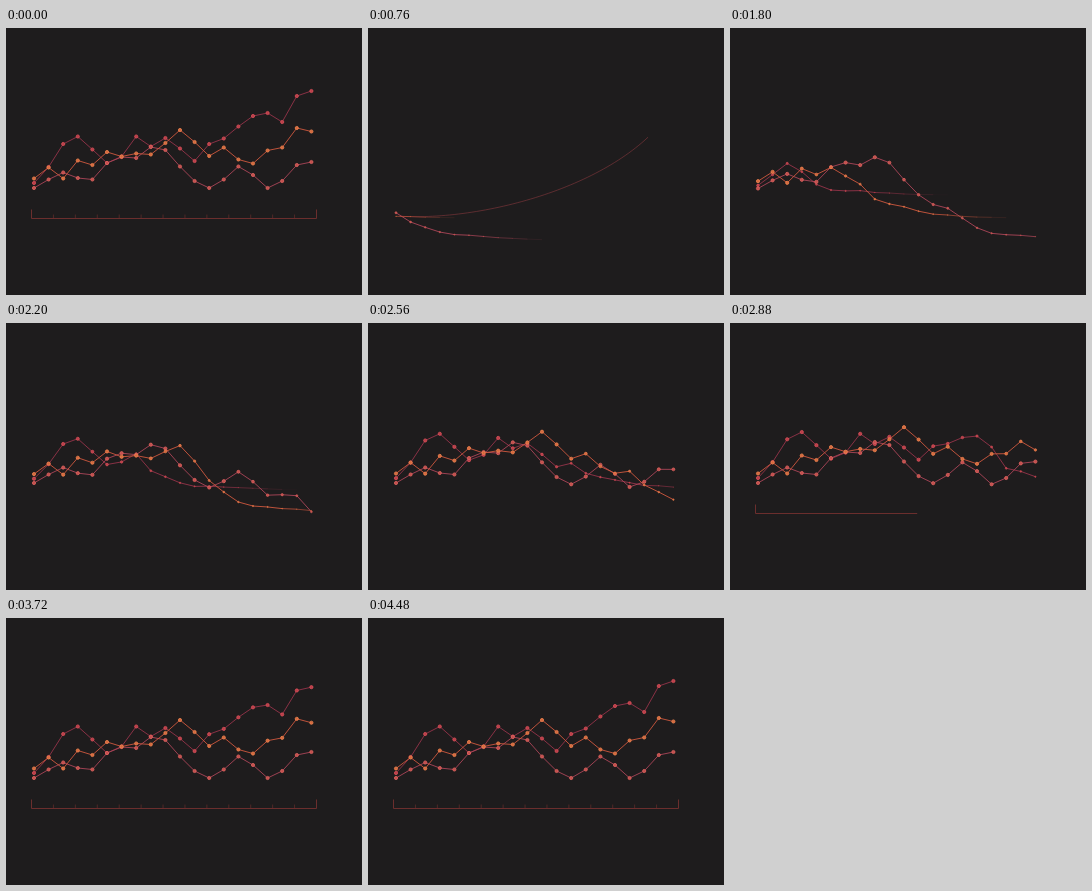
Write an HTML page with a canvas that moves like this. It is 356x267 px and loops after 5520 ms.

```html
<!DOCTYPE html>
<html lang="en">
<head>
<meta charset="utf-8">
<title>Line chart</title>
<style>
  html, body { margin: 0; width: 100%; height: 100%; overflow: hidden; background: #1e1c1d; }
  canvas { display: block; width: 100vw; height: 100vh; }
</style>
</head>
<body>
<canvas id="stage"></canvas>
<script>
const WIDTH = 356, HEIGHT = 267, LOOP = 5520;
const canvas = document.getElementById('stage');
const ctx = canvas.getContext('2d');
const ratio = window.devicePixelRatio || 1;
canvas.width = WIDTH * ratio;
canvas.height = HEIGHT * ratio;
ctx.scale(ratio, ratio);
ctx.lineJoin = 'round';

// "middle" is when the first point is half way up; each next point follows 80 ms later.
const STAGGER = 80, RISE = 2400, LEAD = 1000, FADE = 800;
const series = [
  { base: 167, middle: 1600, line: '#96344a', fill: '#b9404b', ring: '#dc5058',
    y: [155, 139, 116, 108.5, 121.5, 135, 128.5, 108.5, 118.5, 110,
        120.5, 133, 116, 110.5, 98.5, 88, 85, 94, 68, 63] },
  { base: 212, middle: 760, line: '#ac4658', fill: '#c2504f', ring: '#e0645f',
    y: [160, 151.5, 144.5, 150, 151.5, 135, 129, 130, 119, 122,
        138.5, 153, 160, 151.5, 138.5, 147, 160, 153, 137, 134] },
  { base: 190, middle: 1240, line: '#d0583f', fill: '#d56a40', ring: '#f08450',
    y: [150.5, 139.5, 150.5, 132.5, 137, 124, 128.5, 125.5, 126.5, 115,
        102, 114, 128, 119.5, 131.5, 135.5, 122.5, 119.5, 100, 103.5] }
];

const clamp = v => Math.min(1, Math.max(0, v));
const span = (t, from, to) => clamp((t - from) / (to - from));
const smooth = v => v * v * (3 - 2 * v);
const cubicInOut = v => v < .5 ? 4 * v ** 3 : 1 - 4 * (1 - v) ** 3;
const cubicOut = v => 1 - (1 - v) ** 3;

function bezier(a, b, c, d, u) {
  const v = 1 - u;
  return a * v ** 3 + 3 * b * v * v * u + 3 * c * v * u * u + d * u ** 3;
}

// Equivalent to cubic-bezier(.75, 0, .02, 1)
function riseEase(x) {
  if (x <= 0 || x >= 1) return clamp(x);
  let low = 0, high = 1;
  for (let i = 0; i < 24; i++) {
    const mid = (low + high) / 2;
    if (bezier(0, .75, .02, 1, mid) < x) low = mid; else high = mid;
  }
  return smooth(low);
}

function strokePath(points, color, width, alpha = 1) {
  ctx.globalAlpha = alpha;
  ctx.strokeStyle = color;
  ctx.lineWidth = width;
  ctx.beginPath();
  points.forEach(([x, y]) => ctx.lineTo(x, y));
  ctx.stroke();
  ctx.globalAlpha = 1;
}

function drawSwoosh(t) {
  const head = cubicInOut(span(t, 160, 1120));
  const tail = smooth(span(t, 700, 1560));
  if (head <= tail) return;
  const points = Array.from({ length: 61 }, (_, i) => {
    const u = tail + (head - tail) * i / 60;
    return [bezier(28, 125, 284, 314, u), bezier(188, 195, 148, 59, u)];
  });
  strokePath(points, '#8f3a40', .8, .7 * (1 - .5 * span(t, 1000, 1500)));
}

function drawAxis(t) {
  const drawn = cubicOut(span(t, 2700, 3450));
  if (!drawn) return;
  ctx.setLineDash([303 * drawn, 400]);
  strokePath([[25.5, 181.5], [25.5, 190.5], [310.5, 190.5], [310.5, 181.5]], '#6b2e2d', 1);
  ctx.setLineDash([]);
  for (let k = 1; k < 13; k++) {
    const grown = cubicOut(span(t, 3030 + 20 * k, 3120 + 20 * k));
    const x = 25.5 + k * 285 / 13;
    if (grown) strokePath([[x, 190], [x, 190 - 3.5 * grown]], '#5c2c2b', .8);
  }
}

function drawSeries({ base, middle, line, fill, ring, y }, t) {
  const points = y.map((end, i) => {
    const time = t - middle - STAGGER * i;
    return {
      x: 28 + 14.6 * i,
      y: base + (end - base) * riseEase((time + LEAD) / RISE),
      alpha: span(time, -FADE - 60, -400),
      radius: 1.6 * span(time, -FADE, 400)
    };
  });
  points.slice(1).forEach((p, i) => {
    const q = points[i];
    if (p.alpha) strokePath([[q.x, q.y], [p.x, p.y]], line, .9, p.alpha);
  });
  ctx.fillStyle = fill;
  ctx.strokeStyle = ring;
  for (const { x, y, radius } of points) {
    if (!radius) continue;
    ctx.lineWidth = .5 * radius;
    ctx.beginPath();
    ctx.arc(x, y, radius, 0, 2 * Math.PI);
    ctx.fill();
    ctx.stroke();
  }
}

function draw(now) {
  const phase = now % LOOP;
  const t = phase < 40 ? LOOP : phase;
  ctx.fillStyle = '#1e1c1d';
  ctx.fillRect(0, 0, WIDTH, HEIGHT);
  drawSwoosh(t);
  drawAxis(t);
  series.forEach(s => drawSeries(s, t));
}

const start = performance.now();
function tick() {
  draw(performance.now() - start);
  requestAnimationFrame(tick);
}
tick();
</script>
</body>
</html>
```
